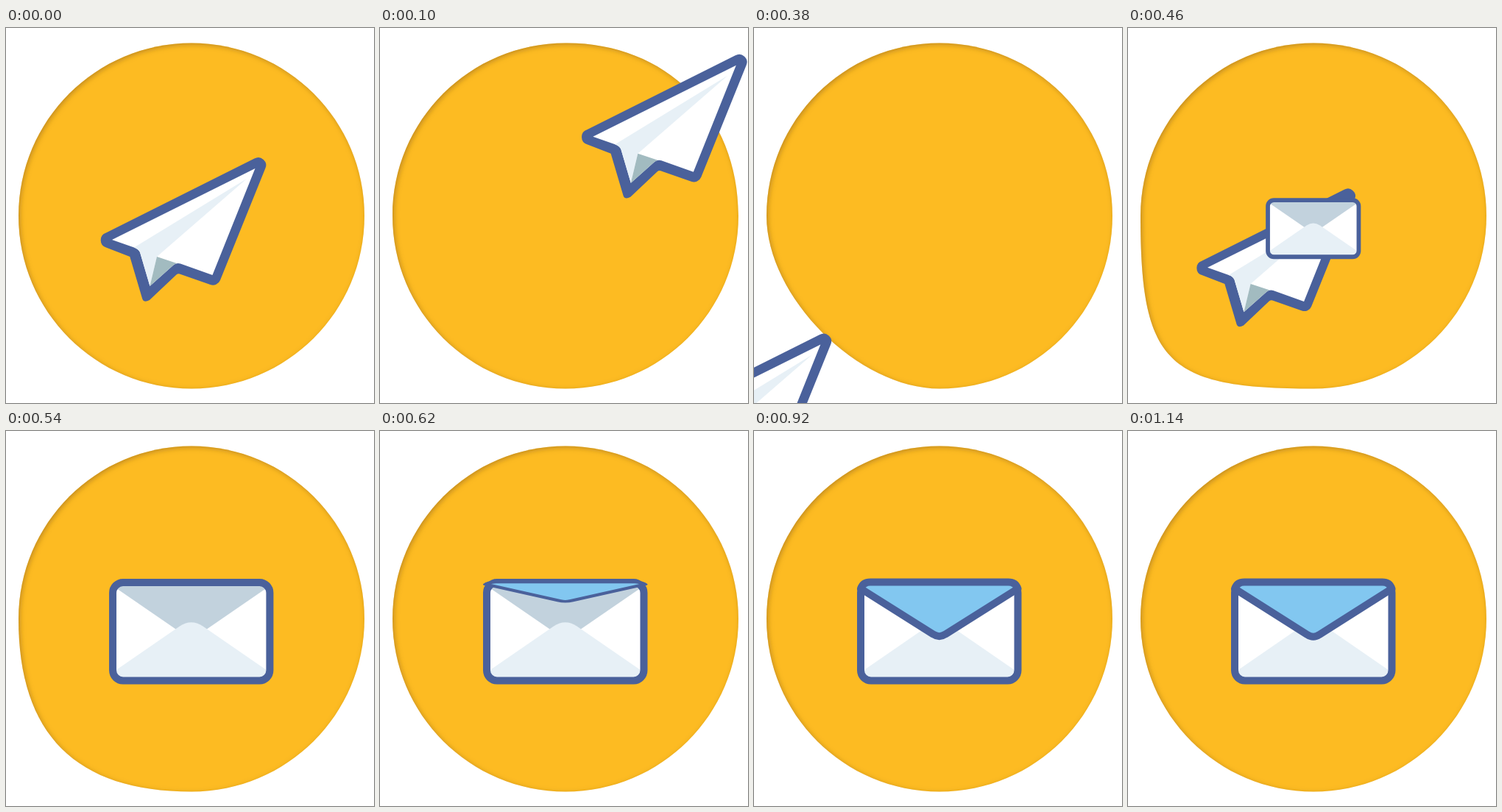
Write an HTML page that moves like this. It is 500 px wide and 510 px high and loops after 1440 ms.

```html
<!DOCTYPE html>
<html lang="en">
<head>
<meta charset="utf-8">
<title>Send mail</title>
<style>
  html, body { margin: 0; width: 100%; height: 100%; overflow: hidden; background: #fff; }
  svg { display: block; width: 500px; height: 510px; }
  .line { fill: none; stroke: #4a619b; stroke-width: 10; stroke-linejoin: round; }
  .pale { fill: #e7f0f6; }
  .white { fill: #fff; }
</style>
</head>
<body>
<svg viewBox="0 0 500 510">
  <defs>
    <clipPath id="inside"><path id="clipBlob"/></clipPath>
    <filter id="soft" filterUnits="userSpaceOnUse" x="-40" y="-40" width="600" height="600">
      <feGaussianBlur stdDeviation="3.5"/>
    </filter>
  </defs>

  <path id="blob" fill="#fdbb22"/>
  <g clip-path="url(#inside)">
    <path id="shade" fill="#9a6b1c" fill-opacity=".6" fill-rule="evenodd" filter="url(#soft)" transform="translate(2 2)"/>
  </g>

  <g id="rays" stroke="#ffe974" stroke-width="7" stroke-linecap="round"></g>

  <g id="plane">
    <path fill="#4a619b" d="M136 278.6L337.5 177.6A10.5 10.5 0 0 1 352.3 191L291 343A10.5 10.5 0 0 1 277.5 349L236 334.4Q233.5 333.6 231.5 335.4L195 370Q187.5 374 185.3 368.5L168.3 311L136 298.6A10.5 10.5 0 0 1 136 278.6Z"/>
    <path class="white" d="M144 288L338.5 191L280.5 336L237 320.5Q232 319 228 322L195.5 351L182 305Q180 300.5 174 298.5Z"/>
    <path class="pale" d="M174 298.5L327 205L205 311L195.5 351L182 305Q180 300.5 174 298.5Z"/>
    <path fill="#a2bbc0" d="M205 311L195.5 351L228 322Q230 320.3 232 320Z"/>
  </g>

  <g id="mail">
    <rect class="white" x="145" y="206" width="213.5" height="133.5" rx="14"/>
    <path fill="#c2d2dd" d="M150 210V214L251.75 284L353.5 214V210Z"/>
    <path class="pale" d="M149 325.5L236 265.5Q251.75 255 267.5 265.5L354.5 325.5Q354 335 345 336H158Q150 335 149 325.5Z"/>
    <rect class="line" x="145" y="206" width="213.5" height="133.5" rx="14"/>
    <path id="flap" class="line" style="fill:#82c7f0" d="M158 205.5H345.5Q355.5 205.5 358.5 214.5L260 277Q251.75 282.6 243.5 277L145 214.5Q148 205.5 158 205.5Z"/>
  </g>
</svg>
<script>
const LOOP = 1440, STEP = 20, END = 1140;
const CX = 252, CY = 255.5, R = 235, K = 0.5523;
const $ = id => document.getElementById(id);
const clipBlob = $('clipBlob'), blob = $('blob'), shade = $('shade');
const plane = $('plane'), mail = $('mail'), flap = $('flap'), rays = $('rays');

const progress = (t, start, length) => Math.min(1, Math.max(0, (t - start) / length));
const quadIn = u => u * u;
const cubicOut = u => 1 - (1 - u) ** 3;
const elasticOut = u => u <= 0 ? 0 : u >= 1 ? 1
  : 1 + 2 ** (-10 * u) * Math.sin((u - 0.125) * 4 * Math.PI);
const scaleAt = (x, y, sx, sy = sx) =>
  `translate(${x} ${y}) scale(${sx} ${sy}) translate(${-x} ${-y})`;

// Eased interpolation through [time, value] pairs
function follow(t, keys) {
  for (let i = 1; i < keys.length; i++) {
    const [t0, a] = keys[i - 1], [t1, b] = keys[i];
    if (t < t1) return a + (b - a) * (1 - Math.cos(Math.PI * progress(t, t0, t1 - t0))) / 2;
  }
  return keys[keys.length - 1][1];
}

const exitBulge = [[80, 0], [180, 1], [340, 0]];
const entryBulge = [[345, 0], [383, -0.28], [460, 1], [600, 0]];

// Circle of four curves; the top right and bottom left ones can swell
function blobPath(out, back) {
  const h = K * R, b = (K + 0.3 * back) * R;
  const left = CX - R, right = CX + R, top = CY - R, bottom = CY + R;
  return `M${CX} ${top}` +
    `C${CX + h + 48 * out} ${top - 10.5 * out} ${right} ${CY - h - 105.7 * out} ${right} ${CY}` +
    `C${right} ${CY + h} ${CX + h} ${bottom} ${CX} ${bottom}` +
    `C${CX - b} ${bottom} ${left} ${CY + b} ${left} ${CY}` +
    `C${left} ${CY - h} ${CX - h} ${top} ${CX} ${top}Z`;
}

const RAYS = 7;
for (let i = 0; i < RAYS; i++) {
  const ray = document.createElementNS('http://www.w3.org/2000/svg', 'line');
  ray.setAttribute('transform', `translate(251.5 256.5) rotate(${i * 360 / RAYS})`);
  rays.append(ray);
}

function drawBlob(t) {
  const d = blobPath(follow(t, exitBulge), follow(t, entryBulge));
  blob.setAttribute('d', d);
  clipBlob.setAttribute('d', d);
  shade.setAttribute('d', 'M-30 -30H550V550H-30Z' + d);
}

function drawPlane(t) {
  const shift = t < 260
    ? 420 * quadIn(progress(t, 0, 170))
    : -400 * quadIn(1 - progress(t, 344, 169.5));
  const size = 1 - quadIn(progress(t, 440, 100));
  plane.style.display = size > 0 ? '' : 'none';
  plane.setAttribute('transform', `translate(${shift} ${-0.965 * shift}) ${scaleAt(241, 273, size)}`);
}

function drawMail(t) {
  const size = cubicOut(progress(t, 430, 120));
  const fold = elasticOut(progress(t, 597, 550));
  mail.style.display = size > 0 ? '' : 'none';
  mail.setAttribute('transform', scaleAt(251.75, 272.5, size));
  flap.style.display = fold > 0 ? '' : 'none';
  flap.setAttribute('transform', scaleAt(251.75, 205.5, 1, fold));
}

function drawRays(t) {
  rays.style.display = t > 620 && t < 820 ? '' : 'none';
  const outer = 210 * cubicOut(progress(t, 620, 140));
  const inner = 210 * cubicOut(progress(t, 640, 180));
  for (const ray of rays.children) {
    ray.setAttribute('y1', -inner);
    ray.setAttribute('y2', -outer);
  }
}

function draw(now) {
  const t = Math.min(END, Math.floor((now % LOOP) / STEP) * STEP);
  drawBlob(t);
  drawPlane(t);
  drawMail(t);
  drawRays(t);
}

let start;
function tick(now) {
  start ??= now;
  draw(now - start);
  requestAnimationFrame(tick);
}
draw(0);
requestAnimationFrame(tick);
</script>
</body>
</html>
```
